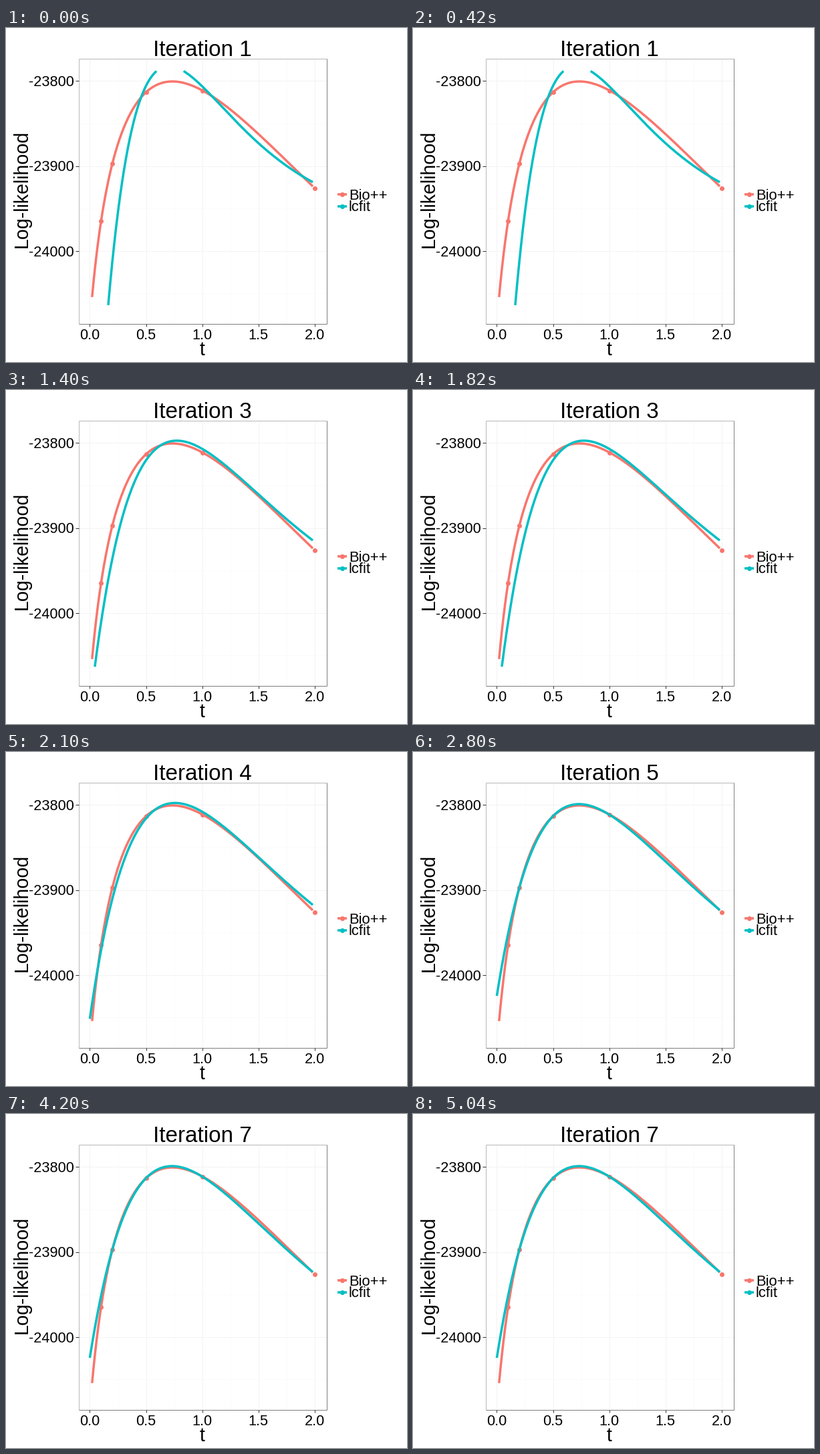
A matplotlib script that plays this animation: 600 by 500 pixels, repeating every 5.6 s.

```python
import numpy as np
import matplotlib.pyplot as plt
from matplotlib.animation import FuncAnimation

W, H, DPI = 600, 500, 100
PX = 72 / DPI  # points per pixel
RED, TEAL = "#F8766D", "#00BFC4"
BORDER_DARK, BORDER_LIGHT = "#7F7F7F", "#B8B8B8"
LEFT, RIGHT, TOP, BOTTOM = 108.5, 479.5, 45.5, 442.5
STEPS = 7

plt.rcParams["font.family"] = "Liberation Sans"
fig = plt.figure(figsize=(W / DPI, H / DPI), dpi=DPI, facecolor="white")
ax = fig.add_axes([0, 0, 1, 1])
ax.set(xlim=(0, W), ylim=(H, 0))
ax.axis("off")


def x_px(t):
    return 125.4 + 168.5 * np.asarray(t)


def y_px(value):
    return 79.3 - 1.272 * (value + 23800)


def line(xs, ys, color, width=1.0, z=1):
    return ax.plot(xs, ys, color=color, lw=width * PX, zorder=z,
                   solid_capstyle="butt")[0]


def dots(xs, ys, color, z):
    ax.plot(xs, ys, "o", color=color, ms=7 * PX, mew=0, zorder=z)


def text(x, y, s, size, **kw):
    return ax.text(x, y, s, fontsize=size * PX, color="black",
                   **{"va": "baseline", **kw})


# The sampled likelihoods; the red curve runs through them.
SAMPLE_T = np.array([0.1, 0.2, 0.5, 1, 2])
SAMPLE_Y = np.array([289, 203, 96, 93.5, 240.3])
PEAK_T, PEAK_Y = 0.735, 80


def likelihood(t):
    """The root of the drop from the peak is almost linear in log t."""
    root = np.sign(SAMPLE_T - PEAK_T) * np.sqrt(SAMPLE_Y - PEAK_Y)
    fit = np.polyfit(np.log(SAMPLE_T + 0.3), root, 4)
    return PEAK_Y + np.polyval(fit, np.log(t + 0.3)) ** 2


# Peak t, peak y, depth and rate of the rough first fit, then of the
# refinement, which closes in on the best fit at its own pace for each.
ROUGH = np.array([0.702, 57, 241, 1.48])
REFINED = np.array([0.786, 75.5, 255.4, 1.164])
BEST = np.array([0.73, 78, 358, 0.876])
PACE = np.array([0.7, 0.35, 1.8, 2.4])


def fit_params(step):
    if step == 0:
        return ROUGH
    remaining = max(0, (4 - step) / 3)
    return BEST + (REFINED - BEST) * remaining ** PACE


def approximation(t, step):
    peak_t, peak_y, depth, rate = fit_params(step)
    y = peak_y + depth * (1 - np.exp(-rate * (t - peak_t))) ** 2
    return np.where((y > 64.3) & (y < 417), y, np.nan)


def draw_axes():
    for t in np.arange(0.25, 2, 0.5):
        line([x_px(t)] * 2, [TOP, BOTTOM], "#FBFBFB")
    for value in (-23850, -23950, -24050):
        line([LEFT, RIGHT], [y_px(value)] * 2, "#FBFBFB")

    for t in np.arange(0, 2.1, 0.5):
        x = x_px(t)
        line([x, x], [TOP, BOTTOM], "#F3F3F3")
        line([x, x], [BOTTOM, BOTTOM + 4.5], "#333333", z=6)
        text(x - 0.4, 466, f"{t:.1f}", 21.6, ha="center")
    for value in (-23800, -23900, -24000):
        y = y_px(value)
        line([LEFT, RIGHT], [y, y], "#F3F3F3")
        line([LEFT - 4.5, LEFT], [y, y], "#333333", z=6)
        text(101.4, y + 7.8, str(value), 21.6, ha="right")

    line([LEFT, RIGHT], [TOP, TOP], BORDER_LIGHT, z=5)
    line([LEFT, LEFT], [TOP, BOTTOM], BORDER_LIGHT, z=5)
    line([LEFT, RIGHT], [BOTTOM, BOTTOM], BORDER_DARK, z=5)
    line([RIGHT, RIGHT], [TOP, BOTTOM], BORDER_DARK, z=5)

    text(294, 490, "t", 28.5, ha="center")
    text(31.3, 241, "Log-likelihood", 28.5, ha="center", rotation=90,
         rotation_mode="anchor")


def draw_legend():
    for name, y, color in (("Bio++", 249, RED), ("lcfit", 266.5, TEAL)):
        line([496, 510], [y, y], color, 3.5)
        dots([502.7], [y], color, 2)
        text(513, y + 8, name, 22)


draw_axes()
draw_legend()
ts = np.linspace(0.02, 1.98, 300)
line(x_px(ts), likelihood(ts), RED, 3.5, z=2)
dots(x_px(SAMPLE_T), SAMPLE_Y, RED, 3)
fit_line = line([], [], TEAL, 3.5, z=4)
title = text(220, 42, "", 33.3)


def draw(frame):
    step = min(frame, STEPS - 1)  # the last step is held twice as long
    t = np.linspace(0, 1.98, 800)
    fit_line.set_data(x_px(t), approximation(t, step))
    title.set_text(f"Iteration {step + 1}")
    return fit_line, title


anim = FuncAnimation(fig, draw, frames=STEPS + 1, interval=700, repeat=True,
                     repeat_delay=0)
plt.show()
```
